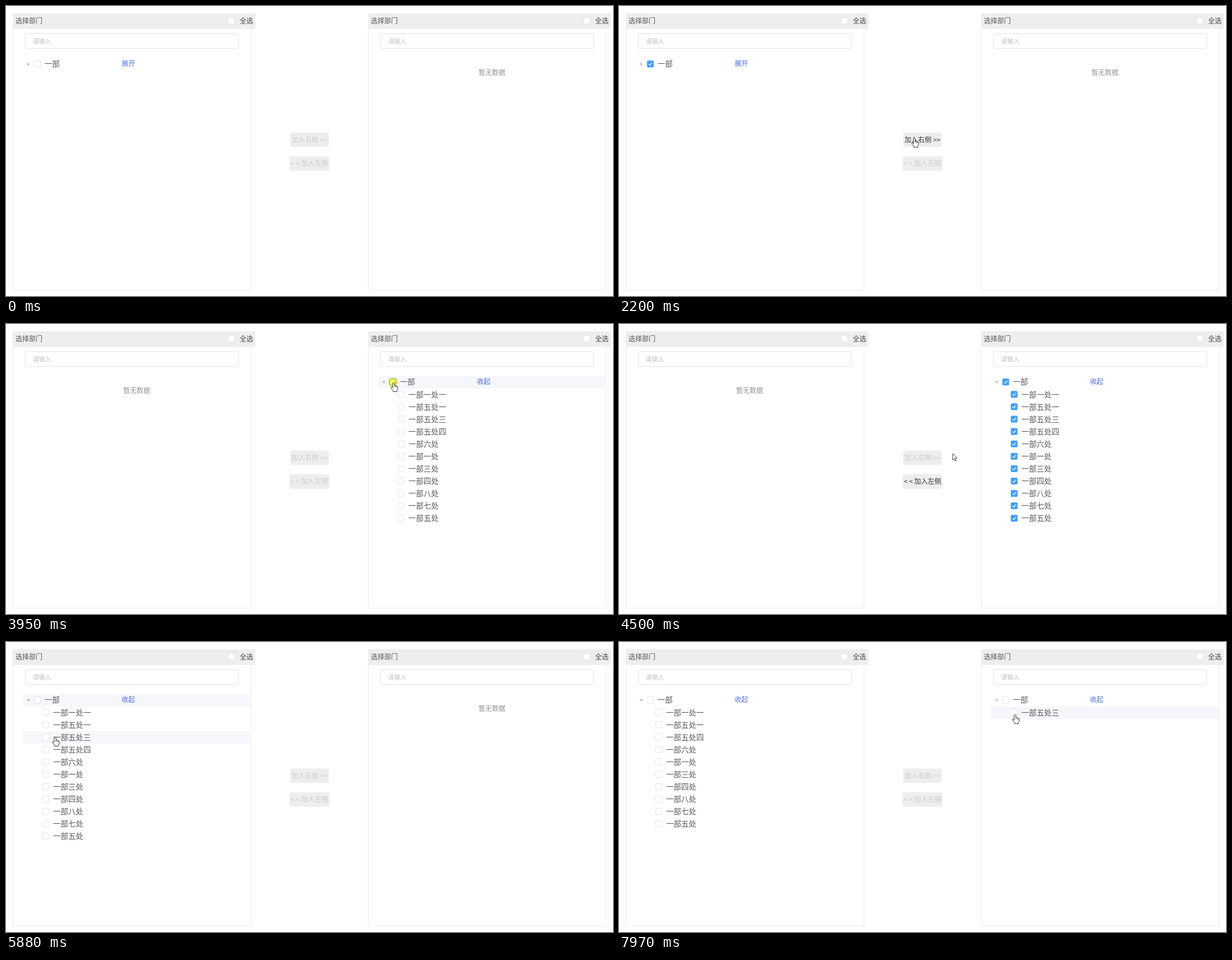
These frames come from a looping animation (1083x517 px, 8000 ms). An HTML page:

```html
<!DOCTYPE html>
<html lang="zh-CN">
<head>
<meta charset="utf-8">
<title>部门选择</title>
<style>
html, body { margin: 0; width: 100%; height: 100%; overflow: hidden; background: #fff; }
svg { display: block; width: 1083px; height: 517px; }
text { font-family: "Noto Sans CJK SC", "Noto Sans CJK", sans-serif; white-space: pre; }
</style>
</head>
<body>
<svg viewBox="0 0 1083 517">
  <g id="base"></g>
  <g id="scene"></g>
</svg>
<script>
const LOOP = 8000, SHIFT = 634, ROW = 22.09, TOP = 93;
const PICKED = '一部五处三';
const UNITS = [...'一六一三四八七五'].map(n => `一部${n}处`);
UNITS.splice(0, 1, '一部一处一', '一部五处一', PICKED, '一部五处四');
const BLUE = '#409eff', LINK = '#4a6fe6', INK = '#58585c';

const within = (t, a, b) => t >= a && t < b;
const clamp = k => Math.max(0, Math.min(1, k));
const ease = k => k * k * (3 - 2 * k);
const rowMid = row => 103.3 + row * ROW;

// A stop of the pointer; if it clicks there, the page reacts shortly after the press.
const stop = (x, y, at, wait) =>
  ({ x, y, at, leave: at + wait, press: at + 50, effect: at + 130 });
const boxStop = (dx, row, at, wait) =>
  stop(57.5 + dx + (row ? 14 : 0), rowMid(row) + 0.7, at, wait);

const enter = stop(1009, 512, 120, 0);
const checkRoot = stop(56, 99, 1570, 190);
const sendAll = stop(536, 238, 2240, 840);
const checkAll = boxStop(SHIFT, 0, 3860, 260);
const returnAll = stop(562, 275, 4690, 170);
const expand = stop(38, 104, 5410, 190);
const checkOne = boxStop(0, 3, 5990, 370);
const sendOne = stop(538, 238, 6990, 220);
const clicks = [checkRoot, sendAll, checkAll, returnAll, expand, checkOne, sendOne];
const route = [
  enter, stop(69, 104, 890, 60), stop(45, 103, 1330, 150), checkRoot, sendAll, checkAll,
  returnAll, stop(78, 135, 5070, 0), expand, stop(87.5, 169, 5870, 20),
  checkOne, sendOne, stop(706.5, 129, 7960, 40)
];
const between = (t, a, b) => within(t, a.effect, b.effect);

function pointerAt(t) {
  if (t < enter.at) return null;
  const i = route.findLastIndex(s => t >= s.at);
  const a = route[i], b = route[i + 1] || a;
  const k = b === a ? 0 : ease(clamp((t - a.leave) / (b.at - a.leave)));
  return { x: a.x + (b.x - a.x) * k, y: a.y + (b.y - a.y) * k };
}

const rect = (x, y, w, h, fill, extra = '') =>
  `<rect x="${x}" y="${y}" width="${w}" height="${h}" fill="${fill}" ${extra}/>`;

// Text is placed by its left edge and the middle of its glyphs.
const text = (x, mid, size, fill, s, extra = '') =>
  `<text x="${x}" y="${mid + size * 0.38}" font-size="${size}" fill="${fill}" ${extra}>${
    s.replace(/</g, '&lt;').replace(/>/g, '&gt;')}</text>`;

// Marks: '' empty, 'press' outlined, 'on' ticked, 'half' dashed
function checkbox(x, mid, mark = '') {
  const d = { on: `M${x + 2.6} ${mid}l2.2 2.5 4-5`, half: `M${x + 2.5} ${mid}h6.2` }[mark];
  return rect(x, mid - 5.6, 11.2, 11.2, d ? BLUE : '#fff',
    `rx="1.5" stroke="${mark ? BLUE : '#dcdfe6'}" stroke-width=".9"`) +
    (d ? `<path d="${d}" fill="none" stroke="#fff" stroke-width="1.2"/>` : '');
}

function frame(dx) {
  return rect(12.5 + dx, 40.5, 424.5, 466, 'none', 'stroke="#ebebeb"') +
    rect(12 + dx, 13, 433, 28, '#eeeeee') +
    text(17 + dx, 26.5, 12, INK, '选择部门') +
    checkbox(396.8 + dx, 26.2) +
    text(417 + dx, 26.3, 12, '#48484c', '全选', 'font-weight="500"') +
    rect(34.3 + dx, 49.3, 380.4, 26.4, '#fff', 'rx="3.5" stroke="#dcdfe6"') +
    text(47.5 + dx, 62.6, 11, '#bcc0c8', '请输入');
}

// Each tree: its units, how far it is open, and its check marks.
function leftTree(t) {
  if (between(t, sendAll, returnAll)) return null;
  const picking = between(t, checkOne, sendOne);
  return {
    dx: 0,
    units: t < sendOne.effect ? UNITS : UNITS.filter(u => u !== PICKED),
    open: ease(clamp((t - expand.effect) / 300)),
    root: between(t, checkRoot, sendAll) ? 'on' : picking ? 'half' : '',
    mark: u => picking && u === PICKED ? 'on' : '',
    focus: within(t, expand.press, checkOne.press)
  };
}

function rightTree(t) {
  const full = between(t, sendAll, returnAll);
  if (!full && t < sendOne.effect) return null;
  const on = between(t, checkAll, returnAll) ? 'on' : '';
  const pressed = within(t, checkAll.press, checkAll.effect);
  return {
    dx: SHIFT, units: full ? UNITS : [PICKED], open: 1,
    root: pressed ? 'press' : on, mark: () => on
  };
}

function hoverRow(tree, p) {
  if (!tree || !p || !within(p.x - tree.dx, 30, 436.5)) return -1;
  const row = Math.floor((p.y - TOP) / ROW);
  return row <= tree.units.length * tree.open ? row : -1;
}

function drawTree(tree, dx, hover) {
  if (!tree) return text(209 + dx, 118.3, 12, '#8f9196', '暂无数据');
  const band = row => rect(30 + dx, TOP + row * ROW, 406.5, ROW, '#f5f7fa');
  let out = hover === 0 || tree.focus ? band(0) : '';
  out += `<path d="M-2 -3.5L2.6 0L-2 3.5Z" fill="#c0c4cc"
    transform="translate(${40 + dx} 103.8) rotate(${90 * tree.open})"/>`;
  out += checkbox(50.4 + dx, rowMid(0), tree.root) +
    text(68.8 + dx, rowMid(0), 13.5, INK, '一部') +
    text(206.2 + dx, 102.8, 12, LINK, tree.open > 0 ? '收起' : '展开');
  if (tree.open > 0) {
    const rows = tree.units.map((u, i) => (hover === i + 1 ? band(i + 1) : '') +
      checkbox(65.5 + dx, rowMid(i + 1), tree.mark(u)) +
      text(84 + dx, rowMid(i + 1), 13.5, INK, u)).join('');
    const height = tree.units.length * ROW * tree.open;
    out += `<clipPath id="clip${dx}">${rect(12 + dx, TOP + ROW, 426, height, '#000')}</clipPath>
      <g clip-path="url(#clip${dx})">${rows}</g>`;
  }
  return out;
}

const button = (x, y, w, label, stop) => ({ x, y, w, h: 25.7, label, stop });
const buttons = [
  button(507, 225.5, 69, '加入右侧 >>'),
  button(505.7, 268, 71.6, '< < 加入左侧')
];

function drawButton(b, enabled) {
  return rect(b.x, b.y, b.w, b.h, '#eeeeee', 'rx="4"') +
    text(b.x + b.w / 2, b.y + 12.5, 12, enabled ? '#333' : '#cacaca', b.label, 'text-anchor="middle"');
}

// Input-language hint, beside the place of the click until the next press
function hint(t, click, next, ink) {
  if (!within(t, click.effect + 100, next.press)) return '';
  return `<g transform="translate(${click.x + 8.8} ${click.y + 8.6})">` +
    rect(.5, .5, 19, 19, '#fafafa', 'rx="1" stroke="#b4b4b4"') +
    text(11, 5, 6.5, '#222', '英') + text(2, 15, 7.5, ink, 'en') +
    `<g fill="none" stroke="${ink}" stroke-width="1.8">
      <path d="M3 11Q5 7 10 6.5M8 4.8L10.4 6.4L8.6 8.6"/>
      <path d="M17 9Q16 13 11.5 13.5M13.4 11.6L11 13.6L13.6 15.4"/></g></g>`;
}

const SHAPES = {
  arrow: `<path d="M0 0V11.2L2.6 8.9L4.5 13L6.3 12.2L4.5 8.2H8Z" fill="#fff"
    stroke="#222" stroke-width=".9"/>`,
  hand: `<path d="M-1.6 1.4Q0 -1 1.6 1.4V6Q3.2 5 4 6.5Q5.4 5.8 5.9 7.2Q7.5 7 7.5 8.8V12L6 14.6V16.6H-.8V14.8
    L-4.6 10.2Q-4.8 8.2 -3.1 8.6L-1.6 10Z" fill="#fff" stroke="#222" stroke-width=".95"/>
    <path d="M1.6 6V8.8M4 6.5V9M5.9 7.2V9.2" stroke="#222" stroke-width=".7"/>`,
  blocked: `<g fill="#fff" stroke="#cf1820" stroke-width="1.8"><circle r="4.7"/>
    <path d="M-3.2 -3.2L3.2 3.2"/></g>`
};

function render(t) {
  const p = pointerAt(t);
  const trees = [leftTree(t), rightTree(t)];
  const hovers = trees.map(tree => hoverRow(tree, p));
  const enabled = [
    between(t, checkRoot, sendAll) || between(t, checkOne, sendOne),
    between(t, checkAll, returnAll)
  ];
  const over = buttons.findIndex(b =>
    p && within(p.x, b.x, b.x + b.w) && within(p.y, b.y, b.y + b.h));
  const shape = over >= 0 ? (enabled[over] ? 'hand' : 'blocked')
    : hovers.some(h => h >= 0) ? 'hand' : 'arrow';

  let out = trees.map((tree, i) => drawTree(tree, i * SHIFT, hovers[i])).join('') +
    buttons.map((b, i) => drawButton(b, enabled[i])).join('') +
    hint(t, sendAll, checkAll, '#1c1c1c') +
    hint(t, returnAll, expand, '#8c1a1a');

  const click = clicks.find(c => within(t, c.press, c.press + 120));
  if (click)
    out += `<circle cx="${click.x - 1}" cy="${click.y}" r="8.8" fill="#ffff3c"
      fill-opacity=".8" style="mix-blend-mode:multiply"/>`;
  if (p) out += `<g transform="translate(${p.x} ${p.y})">${SHAPES[shape]}</g>`;
  document.getElementById('scene').innerHTML = out;
}

document.getElementById('base').innerHTML = frame(0) + frame(SHIFT);
function tick() {
  render(performance.now() % LOOP);
  requestAnimationFrame(tick);
}
tick();
</script>
</body>
</html>
```
